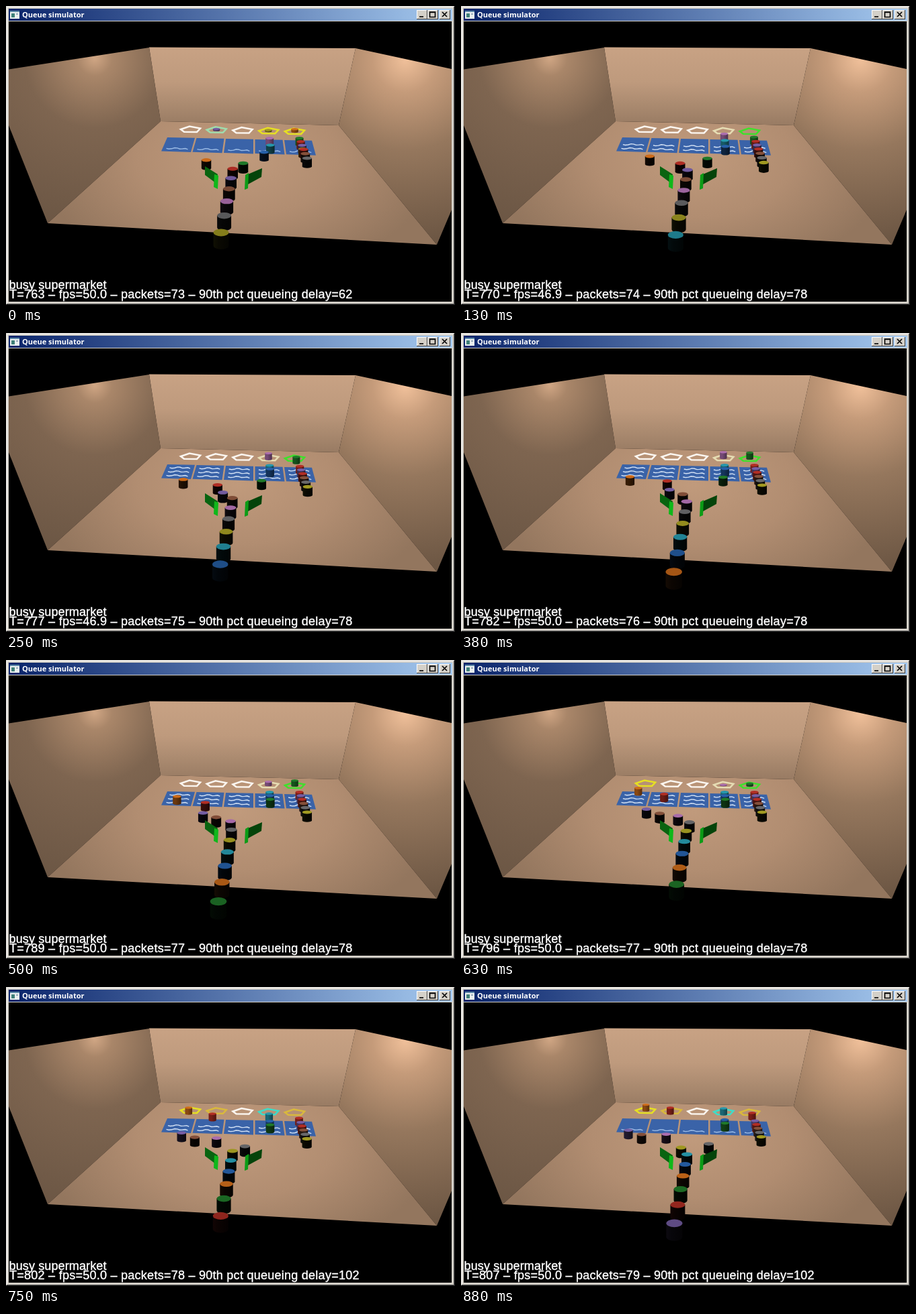
These frames come from a looping animation (668 by 446 pixels, 1.01 s). An HTML page with a canvas:

```html
<!DOCTYPE html>
<html lang="en">
<head>
<meta charset="utf-8">
<title>Queue simulator</title>
<style>
  html, body { margin: 0; width: 668px; height: 446px; overflow: hidden; background: #000; }
  svg, canvas { position: absolute; left: 0; top: 0; display: block; }
  .title { font: 700 11px "Noto Sans", sans-serif; fill: #fff; }
  .info { font: 18px "Liberation Sans", Arial, sans-serif; fill: #fff; stroke: #fff; stroke-width: .4px; letter-spacing: .13px; }
  #status { letter-spacing: .26px; }
</style>
</head>
<body>
<svg width="668" height="446" viewBox="0 0 668 446">
  <defs>
    <linearGradient id="bar"><stop stop-color="#0a246a"/><stop offset="1" stop-color="#a6caf0"/></linearGradient>
    <linearGradient id="back" x1="0" y1="0" x2="0" y2="1">
      <stop stop-color="#c8a284"/><stop offset=".45" stop-color="#be9a7d"/><stop offset="1" stop-color="#987b63"/>
    </linearGradient>
    <radialGradient id="left" gradientUnits="userSpaceOnUse" cx="132" cy="78" r="260">
      <stop stop-color="#d0a684"/><stop offset=".1" stop-color="#a98669"/><stop offset=".4" stop-color="#7e6550"/>
      <stop offset="1" stop-color="#6b5644"/>
    </radialGradient>
    <radialGradient id="right" gradientUnits="userSpaceOnUse" cx="594" cy="80" r="270">
      <stop stop-color="#f0c09a"/><stop offset=".18" stop-color="#c59b7a"/><stop offset=".5" stop-color="#95775d"/>
      <stop offset="1" stop-color="#6d5744"/>
    </radialGradient>
    <radialGradient id="floor" gradientUnits="userSpaceOnUse" cx="345" cy="225" r="300" gradientTransform="matrix(1 0 0 .6 0 90)">
      <stop stop-color="#c09a7c"/><stop offset=".5" stop-color="#b18d71"/><stop offset="1" stop-color="#93765e"/>
    </radialGradient>
    <clipPath id="view"><rect x="4" y="23" width="659" height="418"/></clipPath>
  </defs>

  <rect width="668" height="446" fill="#181818"/>
  <rect width="667" height="445" fill="#d4d0c8"/>
  <path d="M1.5 444V1.5H666" fill="none" stroke="#fff"/>
  <path d="M1 444.5H666.500V1" fill="none" stroke="#505050"/>
  <rect x="4" y="4" width="660" height="18" fill="url(#bar)"/>
  <path d="M6 7h14v12H6z" fill="#e8eeee"/>
  <path d="M6 7h14v2H6z" fill="#5c88a8"/>
  <path d="M8 11h5v6H8z" fill="#3f8078"/>
  <path d="M15 11h3v2h-3z" fill="#9ab"/>
  <text class="title" x="24" y="17">Queue simulator</text>
  <g id="buttons"></g>

  <g clip-path="url(#view)">
    <rect x="4" y="23" width="659" height="418"/>
    <path d="M4 94.500L213 62 230 172 62 324 4 178z" fill="url(#left)"/>
    <path d="M520 63L663 94V304L641 356 495 178z" fill="url(#right)"/>
    <path d="M213 61.500L520 63 495 178 230 172z" fill="url(#back)"/>
    <path d="M230 172L495 178 641 356 62 324z" fill="url(#floor)"/>
  </g>
  <text class="info" x="4.500" y="421.500">busy supermarket</text>
  <text class="info" id="status" x="5" y="436"></text>
</svg>
<canvas id="stage" width="668" height="446"></canvas>

<script>
const ctx = document.getElementById('stage').getContext('2d');
const statusText = document.getElementById('status');

const drawButton = (x, w, glyph) => `<path d="M${x} 6h${w}v14h${-w}z" fill="#404040"/>
  <path d="M${x} 6h${w - 1}v13h${1 - w}z" fill="#fff"/>
  <path d="M${x + 1} 7h${w - 2}v12h${2 - w}z" fill="#d4d0c8"/>
  <path d="${glyph}" fill="none" stroke="#000" stroke-width="1.600"/>`;
document.getElementById('buttons').innerHTML =
  drawButton(611, 16, 'M615 16h6') +
  drawButton(627, 16, 'M630.500 9h8v7.500h-8zM630 9.500h9') +
  drawButton(645, 16, 'M649 9l7 7M656 9l-7 7');

const DURATION = 1010;
const CLOCK = [763, 770, 777, 782, 789, 796, 802, 807];
const startOf = i => Math.round(i * 12.5) * 10;

const HUE = {
  orange: [206, 108, 26], red: [178, 46, 36], purple: [118, 94, 164], brown: [132, 80, 58],
  pink: [172, 110, 174], grey: [104, 104, 106], yellow: [164, 156, 34], cyan: [38, 152, 172],
  blue: [38, 96, 168], green: [32, 122, 42]
};
const GLOW = {
  orange: '#e6e022', yellow: '#e6e022', red: '#d9b93c', pink: '#e6ddb4',
  green: '#3fe02c', cyan: '#3fdcc8', purple: '#9fdcae'
};

// Customers arrive at a fixed gap: hue and desk.
const FIRST = 603, GAP = 8, LEAD = 6, WALK = 40, SPEED = 1.8, ENTRY = 213;
const ORDER = 'orange4 yellow3 purple1 pink3 green4 red4 purple4 red4 brown4 grey4 yellow4 cyan3 blue3 ' +
  'orange0 green3 red1 purple0 brown0 pink1 grey4 yellow0 cyan1 blue0 orange1 green0 red1 purple0';
const TURNS = [[], [766], [], [766, 797], [769, 801]]; // clock of "next, please" at each desk
const TURN_TIME = 12, SINK_TIME = 14;

const clamp = v => Math.max(0, Math.min(1, v));
const mix = (a, b, k) => [a[0] + (b[0] - a[0]) * k, a[1] + (b[1] - a[1]) * k];
const ringAt = desk => [274 + 38.75 * desk, 184 + .75 * desk];
const onLane = (desk, y) => [ringAt(desk)[0] + (y - 177) * (desk - 2.65) * .28, y];

// The aisle from the entrance to the gate, in perspective.
function aisle(age) {
  const y = 30 + 27530 / (age + 89.4);
  return [320 + (338 - y) * .181, y];
}
const GATE = aisle(WALK);

const queued = TURNS.map(() => 0);
const cans = ORDER.split(' ').map((word, i) => {
  const desk = +word.slice(-1);
  const entry = onLane(desk, ENTRY);
  const stroll = 13 + .25 * Math.hypot(entry[0] - GATE[0], entry[1] - GATE[1]);
  return { hue: word.slice(0, -1), desk, entry, stroll, birth: FIRST + i * GAP, rank: queued[desk]++ };
});

function restY(desk, rank) {
  const top = ringAt(desk)[1] - 8.5, back = rank - 1;
  return back < 0 ? top + (197 - top) * rank : 197 + 5 * back + .2 * back * back;
}

function place({ hue, desk, entry, stroll, birth, rank }, clock) {
  const age = clock - birth, past = age - WALK;
  const turns = TURNS[desk], leave = turns[rank] ?? Infinity;
  if (age < -LEAD || clock >= leave) return null;
  if (past < 0) return { hue, at: aisle(age), sink: 0 };
  if (past < stroll) return { hue, at: mix(GATE, entry, past / stroll), sink: 0 };
  const ahead = turns.reduce((r, t) => r - clamp((clock - t) / TURN_TIME), rank);
  const y = Math.max(ENTRY - SPEED * (past - stroll), restY(desk, Math.max(0, ahead)));
  return { hue, desk, at: onLane(desk, y), sink: clamp((clock - leave) / SINK_TIME + 1) };
}

const shade = (hue, k) => `rgb(${HUE[hue].map(v => Math.round(v * k)).join()})`;

function shape(points, fill) {
  ctx.beginPath();
  points.forEach(p => ctx.lineTo(...p));
  ctx.closePath();
  if (fill) {
    ctx.fillStyle = fill;
    ctx.fill();
  }
}

function drawCan({ hue, at: [x, y0], sink }) {
  const y = y0 + 9 * sink;
  const rx = 5.3 + (y0 - 180) * .039, ry = rx * (.32 + (y0 - 180) * .001);
  const h = rx * 1.7 * (1 - sink);
  const lit = clamp((222 - y) / 25);
  const side = ctx.createLinearGradient(x - rx, 0, x + rx, 0);
  side.addColorStop(0, shade(hue, .1 + .55 * lit));
  side.addColorStop(.35, shade(hue, .06 + .62 * lit));
  side.addColorStop(1, shade(hue, .03 + .4 * lit));
  ctx.fillStyle = side;
  ctx.beginPath();
  ctx.ellipse(x, y + h, rx, ry, 0, 0, Math.PI);
  ctx.lineTo(x - rx, y);
  ctx.lineTo(x + rx, y);
  ctx.fill();
  ctx.fillStyle = shade(hue, 1 - .2 * clamp((y - 220) / 120));
  ctx.beginPath();
  ctx.ellipse(x, y, rx, ry, 0, 0, Math.PI * 2);
  ctx.fill();
}

function drawRing([x, y], color) {
  shape([[-14, 0], [-1, -4.5], [15, -1.5], [10, 4], [-9, 3.8]].map(p => [x + p[0], y + p[1]]));
  ctx.strokeStyle = color;
  ctx.lineWidth = 2.6;
  ctx.stroke();
}

function drawBelt(desk, lines) {
  const a = [240 + 43.5 * desk, 196 + desk], b = [a[0] + 41, a[1] + .8];
  const d = [231 + 46.5 * desk, 216.5 + 1.2 * desk], c = [d[0] + 44, d[1] + 1.5];
  shape([a, b, c, d], '#3a63a8');
  ctx.strokeStyle = lines > 1 ? '#d6e4f6' : '#9cbce6';
  ctx.lineWidth = 1.4;
  for (let j = 0; j < lines; j++) {
    ctx.beginPath();
    for (let u = .13; u < .9; u += .0925) {
      const v = .86 - j * .28 - .1 * Math.sin(Math.PI * u) - .04 * Math.sin(18 * u);
      ctx.lineTo(...mix(mix(a, b, u), mix(d, c, u), v));
    }
    ctx.stroke();
  }
}

function drawGates() {
  shape([[296, 239], [315, 251], [312, 264], [296, 252]], '#096410');
  shape([[310, 251], [316, 253], [315, 273], [309, 270]], '#0fb81a');
  shape([[360, 251], [381, 242], [380, 255], [360, 266]], '#04440a');
  shape([[356, 252], [361, 249], [360, 272], [355, 274]], '#0c9c16');
}

function draw(step) {
  const clock = CLOCK[step];
  const lines = Math.min(3, 1 + Math.floor(Math.min(clock - 763, 810 - clock) / 7));
  const shownCans = cans.map(can => place(can, clock)).filter(Boolean);
  ctx.clearRect(0, 0, 668, 446);
  TURNS.forEach((_, desk) => {
    const served = shownCans.find(c => c.desk === desk && c.at[1] < 196);
    drawBelt(desk, lines);
    drawRing(ringAt(desk), served ? GLOW[served.hue] : '#fbf6f0');
  });
  shownCans.sort((p, q) => p.at[1] - q.at[1]).forEach(drawCan);
  drawGates();

  const packets = 53 + Math.floor((clock - FIRST + LEAD) / GAP);
  const fps = step === 1 || step === 2 ? '46.9' : '50.0';
  const delay = clock < 770 ? 62 : clock < 800 ? 78 : 102;
  statusText.textContent = `T=${clock} – fps=${fps} – packets=${packets} – 90th pct queueing delay=${delay}`;
}

let shown;
function tick() {
  const ms = performance.now() % DURATION;
  const step = CLOCK.findLastIndex((_, i) => startOf(i) <= ms);
  if (step !== shown) draw(shown = step);
  requestAnimationFrame(tick);
}
tick();
</script>
</body>
</html>
```
